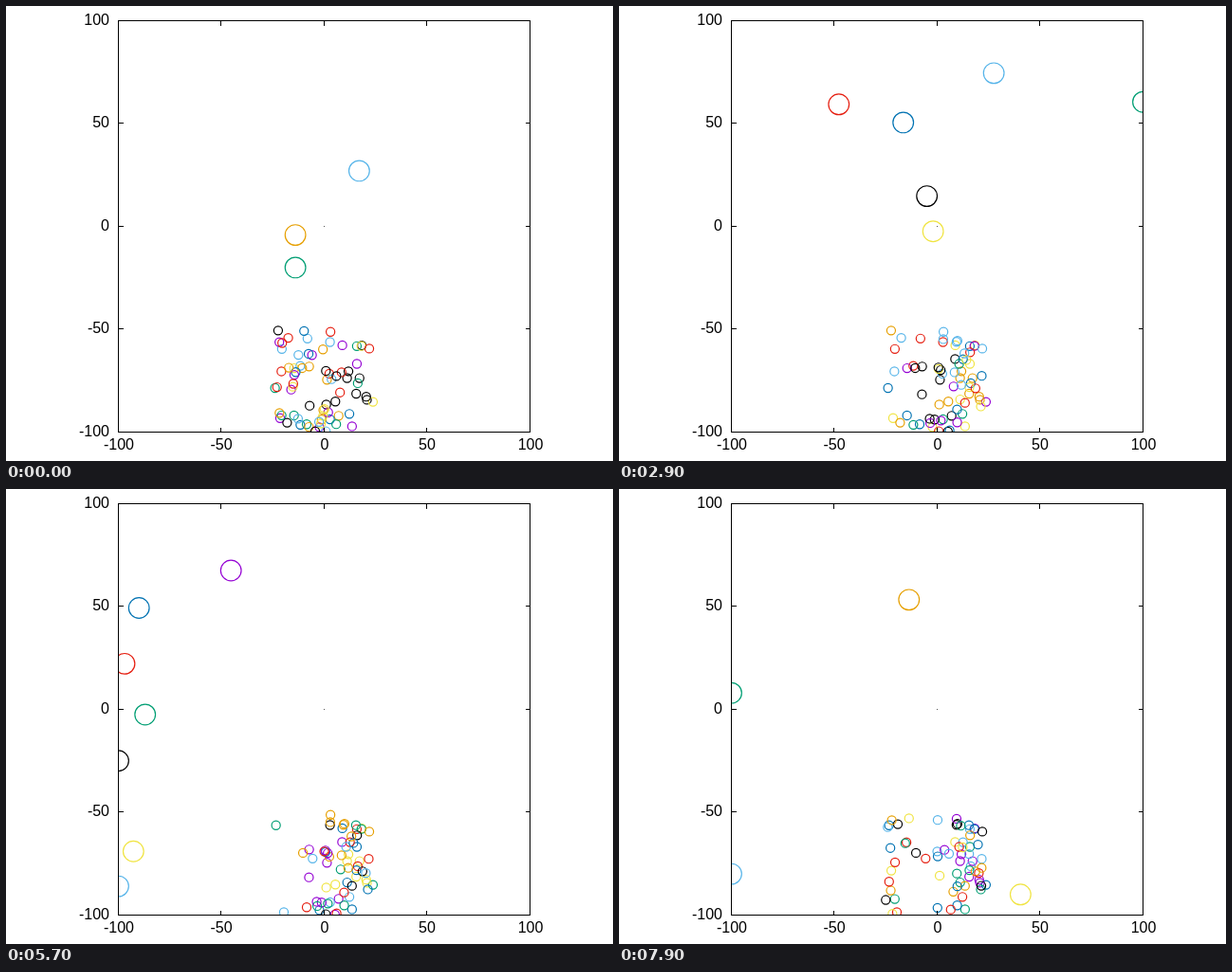
These frames come from a looping animation (640 px wide and 480 px high, 8 s). An HTML page with a canvas:

```html
<!DOCTYPE html>
<html lang="en">
<head>
<meta charset="utf-8">
<title>Circles in a box</title>
<style>
  html, body { margin: 0; width: 100%; height: 100%; overflow: hidden; background: #fff; }
  canvas, svg { position: absolute; left: 0; top: 0; width: 640px; height: 480px; }
  text { font: 16px "Liberation Sans", Arial, sans-serif; fill: #000; }
  path { fill: none; stroke: #000; stroke-width: 1; shape-rendering: crispEdges; }
</style>
</head>
<body>
<canvas id="stage" width="640" height="480"></canvas>
<svg id="axes" viewBox="0 0 640 480"></svg>
<script>
const LOOP = 8000, STEP = 100;
const LEFT = 118.5, TOP = 15.5, SIZE = 434, RIGHT = LEFT + SIZE, BOTTOM = TOP + SIZE;
const UNIT = SIZE / 200;
const COLORS = ['#9400d3', '#009e73', '#56b4e9', '#e69f00', '#f0e442', '#0072b2', '#e51e10', '#000000'];

// Moments at which the paths turn, and how far they bow out between them.
const TURNS = [0, 1900, 2900, 4100, 5700, 7100, 7900];
const BOW = 25;

// Large circles in plot units; each path begins at the turn numbered `first`.
const OUTSIDE = [0, -170];
const balls = [
  { hue: 1, first: 0, from: 0, to: LOOP,
    path: [[-14, -20], [-98, 11], [100, 60.5], [93, -58], [-87, -2.5], [100, -83], [-100, 8]] },
  { hue: 2, first: 0, from: 0, to: LOOP,
    path: [[17, 27], [-32.5, -3.5], [27.5, 74.5], [-90, -9.5], [-100, -86], [33, 43.5], [-100, -80]] },
  { hue: 3, first: 0, from: 0, to: LOOP,
    path: [[-14, -4.2], OUTSIDE, OUTSIDE, OUTSIDE, OUTSIDE, [31.7, 16.3], [-13.7, 53.3]] },
  { hue: 4, first: 1, from: 1000, to: LOOP,
    path: [[-36.5, -82], [-2, -2.4], [62, 86], [-92.7, -69], [17.5, 18], [40.5, -90]] },
  { hue: 5, first: 2, from: 2400, to: 6400, path: [[-16.5, 50.5], [-100, -66], [-90, 49.3]] },
  { hue: 6, first: 2, from: 2400, to: 6400, path: [[-47.8, 59.3], [-60, 107], [-97, 22.2]] },
  { hue: 7, first: 2, from: 2400, to: 6400, path: [[-5, 14.7], [15, 78.8], [-100, -25]] },
  { hue: 0, first: 3, from: 3500, to: 6400, path: [[100, -56.3], [-45.3, 67.5]] }
];

// Spans during which the set of small circles rests.
const RESTS = [[0, 0], [1900, 1900], [2900, 2900], [4100, 5700], [7100, LOOP]];

// Crowds of small circles: how many, first and last rest, leftmost and rightmost place.
const crowds = [
  { count: 15, first: 0, last: 4, left: 10, right: 24 },
  { count: 15, first: 0, last: 3, left: -9, right: 10 },
  { count: 13, first: 0, last: 2, left: -24, right: -5 },
  { count: 31, first: 0, last: 0, left: -25, right: 8 },
  { count: 13, first: 1, last: 4, left: 8, right: 22 },
  { count: 15, first: 1, last: 3, left: -8, right: 20 },
  { count: 7, first: 3, last: 4, left: -24, right: 22 },
  { count: 14, first: 4, last: 4, left: -25, right: -11 },
  { count: 17, first: 4, last: 4, left: 0, right: 24 }
];

function seeded(seed) {
  return () => {
    seed = (seed + 0x6d2b79f5) | 0;
    let n = Math.imul(seed ^ (seed >>> 15), seed | 1);
    n ^= n + Math.imul(n ^ (n >>> 7), n | 61);
    return ((n ^ (n >>> 14)) >>> 0) / 4294967296;
  };
}

const random = seeded(11);
const mix = (a, b, k) => a + (b - a) * k;
const toX = u => LEFT + (u + 100) * UNIT;
const toY = v => BOTTOM - (v + 100) * UNIT;

function makeDot({ first, last, left, right }) {
  return {
    x: mix(left, right, random()),
    y: mix(-100, -50.5, random()),
    hue: Math.floor(random() * 8),
    from: first ? mix(RESTS[first - 1][1], RESTS[first][0], random()) : 0,
    to: last < RESTS.length - 1 ? mix(RESTS[last][1], RESTS[last + 1][0], random()) + 1 : LOOP
  };
}

const dots = crowds.flatMap(crowd => Array.from({ length: crowd.count }, () => makeDot(crowd)));

// Place on a bowed path, held inside the side walls.
function place({ hue, first, path }, t) {
  const turn = TURNS.findLastIndex(time => time <= t);
  const leg = turn - first;
  if (leg < 0) return path[0];
  if (leg >= path.length - 1) return path[path.length - 1];
  const k = (t - TURNS[turn]) / (TURNS[turn + 1] - TURNS[turn]);
  const bow = BOW * Math.sin(Math.PI * k), angle = hue * 2 + turn * 3;
  const x = mix(path[leg][0], path[leg + 1][0], k) + bow * Math.cos(angle);
  const y = mix(path[leg][1], path[leg + 1][1], k) + bow * Math.sin(angle);
  return [Math.max(-100, Math.min(100, x)), y];
}

function drawAxes() {
  const snap = n => Math.ceil(n) - 0.5;
  let lines = `M${LEFT} ${TOP}H${RIGHT}V${BOTTOM}H${LEFT}Z`, labels = '';
  for (let v = -100; v <= 100; v += 50) {
    const x = snap(toX(v)), y = snap(toY(v));
    lines += `M${x} ${BOTTOM}v-5M${x} ${TOP}v5M${LEFT} ${y}h5M${RIGHT} ${y}h-5`;
    labels += `<text x="${x + 0.5}" y="468" text-anchor="middle">${v}</text>` +
      `<text x="109" y="${y + 4.5}" text-anchor="end">${v}</text>`;
  }
  document.getElementById('axes').innerHTML = `<path d="${lines}"/>${labels}`;
}

const ctx = document.getElementById('stage').getContext('2d');

function ring(x, y, radius, hue) {
  ctx.strokeStyle = COLORS[hue % 8];
  ctx.beginPath();
  ctx.arc(toX(x), toY(y), radius * UNIT, 0, 2 * Math.PI);
  ctx.stroke();
}

function draw(t) {
  const alive = item => item.from <= t && t < item.to;
  const flying = balls.filter(alive);
  ctx.clearRect(0, 0, 640, 480);
  ctx.save();
  ctx.beginPath();
  ctx.rect(LEFT, TOP, SIZE, SIZE);
  ctx.clip();
  ctx.lineWidth = 1.2;
  ctx.fillStyle = '#555';
  ctx.fillRect(335, 232, 1, 1);
  for (const ball of flying) ring(...place(ball, t), 5, ball.hue);
  // Colours run on from the large circles, so their count shifts the small ones.
  for (const dot of dots.filter(alive)) ring(dot.x, dot.y, 2.1, dot.hue + flying.length);
  ctx.restore();
}

const start = performance.now();
function tick() {
  const t = (performance.now() - start) % LOOP;
  draw(Math.floor(t / STEP) * STEP);
  requestAnimationFrame(tick);
}

drawAxes();
tick();
</script>
</body>
</html>
```
